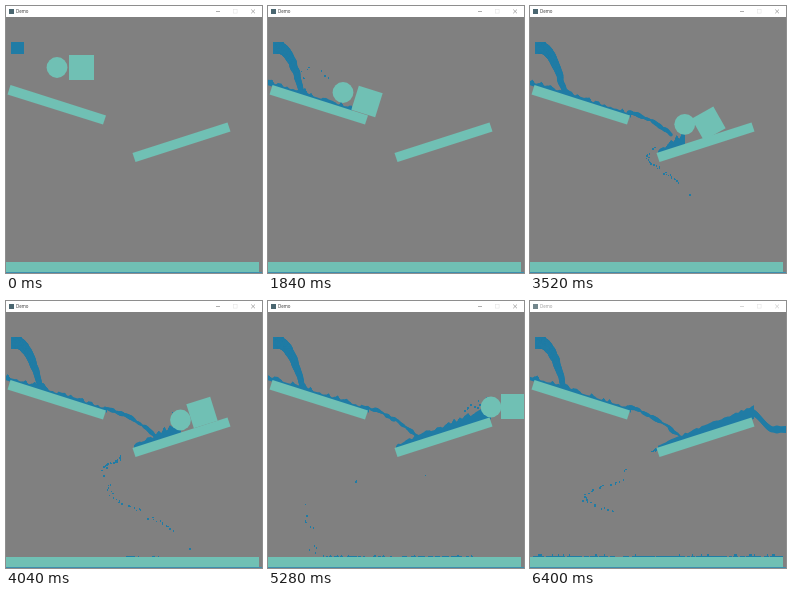
Animation, 256 px wide and 267 px high, one loop 6440 ms. Source, as an HTML page with a canvas:

```html
<!DOCTYPE html>
<html lang="en">
<head>
<meta charset="utf-8">
<title>Fluid demo</title>
<style>
html, body { margin: 0; width: 100%; height: 100%; overflow: hidden; background: #808080; }
canvas { display: block; width: 100vw; height: 100vh; }
#name { position: absolute; left: 10px; top: 2px; font: 4.4px/7px "Open Sans", Arial, sans-serif; }
</style>
</head>
<body>
<canvas id="stage" width="256" height="267"></canvas>
<div id="name">Demo</div>
<script>
const LOOP = 6440, STEP = 40, GRAVITY = 52;
const AIR = '#808080', WATER = '#207ca5', SOLID = '#70c0b4';
const g = document.getElementById('stage').getContext('2d');
const label = document.getElementById('name');

const clamp = (v, a, b) => Math.max(a, Math.min(b, v));
const mix = (a, b, k) => a + (b - a) * k;
const ramp = (v, a, b) => clamp((v - a) / (b - a), 0, 1);
const smooth = k => k * k * (3 - 2 * k);
const fall = t => GRAVITY / 2 * t * t;
const hash = n => { const s = Math.sin(n * 127.1 + 11.7) * 43758.5453; return s - Math.floor(s); };
const noise = v => { const i = Math.floor(v); return mix(hash(i), hash(i + 1), smooth(v - i)); };
const slope1 = x => 79 + 0.321 * (x - 5);
const slope2 = x => 147 - 0.321 * (x - 126.5);

// Landing point first, then a few points on the way out: [time, x, y, degrees]
const boxPath = [
  [0.94, 75.5, 84.5, 0], [1.84, 99, 95.5, 17.5], [2.96, 158, 119.5, 45], [4.04, 196, 111.5, 72.5],
  [4.76, 224.5, 102.5, 74], [5.28, 245.5, 105.5, 90], [5.8, 275, 121, 110]
];
const ballPath = [
  [0.88, 51, 81.6], [1.84, 75, 86.5], [2.96, 132, 113], [4.04, 174.5, 119],
  [4.76, 203.5, 110.5], [5.28, 223, 106], [6.1, 268, 128]
];

// Free fall until the first point, then a smooth curve through the rest
function follow(path, t) {
  if (t < path[0][0]) return [path[0][1], 61.5 + fall(t), 0];
  let i = 0;
  while (i < path.length - 2 && t > path[i + 1][0]) i++;
  const a = path[i], b = path[i + 1], p = path[i - 1] || a, n = path[i + 2] || b;
  const d = b[0] - a[0], k = ramp(t, a[0], b[0]), k2 = k * k, k3 = k2 * k;
  return a.slice(1).map((v, j) => {
    const w = b[j + 1];
    const va = (w - p[j + 1]) / (b[0] - p[0]) * d;
    const vb = (n[j + 1] - v) / (n[0] - a[0]) * d;
    return mix(v, w, smooth(k)) + (k3 - 2 * k2 + k) * va + (k3 - k2) * vb;
  });
}

// Drops spilling off the second ramp; the aim wanders, so neighbours form strings
const drops = [];
for (let born = 2.72; born < 6.4; born += 0.014) {
  const i = drops.length, late = ramp(born, 2.8, 3.8);
  if (noise(born * 9) + 0.3 * hash(born) < mix(0.6, 0.8, ramp(born, 4, 5))) continue;
  drops.push({
    born, life: 9, seed: i * 5,
    x: mix(122, 125, late) + 2 * hash(i), y: mix(125, 147, late),
    vx: mix(15, -60, late) + 60 * (noise(born * 4 + 3) - 0.5) + 8 * (hash(i + 0.5) - 0.5),
    vy: mix(60, 30, late) + 12 * (noise(born * 7) - 0.5)
  });
}

function splash(time, x, y, count, speed, lift, life) {
  for (let i = 0; i < count; i++) {
    const seed = time * 100 + i * 3;
    drops.push({
      born: time + 0.2 * hash(seed), life, seed, x, y,
      vx: speed * (hash(seed + 1) * 1.4 - 0.2), vy: -lift * (0.5 + 0.5 * hash(seed + 2))
    });
  }
}
splash(1.28, 34, 81, 9, 45, 60, 0.75);
splash(2.6, 118, 108, 9, 60, 60, 0.6);
splash(3.35, 170, 110, 1, 120, 25, 2);
splash(4.85, 188, 116, 9, 70, 60, 0.7);

function disc(x, y, r) {
  g.beginPath();
  g.arc(x, y, r, 0, 7);
  g.fill();
}
function poly(...p) {
  g.beginPath();
  for (let i = 0; i < p.length; i += 2) g.lineTo(p[i], p[i + 1]);
  g.fill();
}

function drawDrops(t) {
  for (const d of drops) {
    const a = t - d.born;
    if (a < 0 || a > d.life) continue;
    const y = d.y + d.vy * a + fall(a);
    if (y > 255) continue;
    g.fillRect(Math.round(d.x + d.vx * a), Math.round(y), hash(d.seed) > 0.5 ? 2 : 1, hash(d.seed + 1) > 0.4 ? 2 : 1);
  }
}

function drawInflow(t) {
  g.fillRect(5, 36, t < 0.3 ? 13 : 11, 12);
  for (let a = 0; a < Math.min(t, 1.27); a += 0.02) {
    const sway = a * (noise(a * 9 - t * 8) - 0.5) * 1.6;
    disc(11 + 17.8 * a + sway, 42 + fall(a), 6 - 2.6 * a);
  }
}

function drawFilm(t, boxX) {
  const run = t - 1.25;
  if (run < 0) return;
  const left = Math.max(0, 33 - 75 * run);
  const right = Math.min(33 + 85 * run, boxX - 14, 101);
  for (let x = Math.floor(left); x < right; x++) {
    const bump = noise(x / 3 - t * 11);
    const h = 1.4 + 3.6 * bump * bump + 3 * Math.exp(-(((x - 35) / 5) ** 2));
    g.fillRect(x, slope1(x) - h, 1, h + 2);
  }
}

function drawJet(t) {
  for (let u = 0; u < Math.min(35 * (t - 2.3), 52); u += 0.7) {
    const r = 0.9 + 1.5 * noise(u / 3 - t * 10);
    const sway = 2 * (noise(u / 5 - t * 7 + 40) - 0.5);
    disc(99 + u, 106.5 + 0.25 * u + 0.0063 * u * u + sway, r);
  }
}

// Water piling up behind the ball while it crosses the gap
function drawSplat(t, ballX) {
  const size = ramp(t, 2.4, 2.8) * (1 - ramp(t, 3.1, 3.5));
  for (let d = -15; d < 17; d++) {
    const w = size * (7 - Math.abs(d) * 0.35) * (0.5 + noise(d / 2.5 + t * 4));
    if (w > 0.6) g.fillRect(Math.round(ballX - 11 - w / 2), 116 + d, w, 1);
  }
}

// Wedge held back by the ball, calmer once the ball is gone
function drawPool(t, ballX) {
  if (t < 3.2) return;
  const end = Math.min(ballX, 224), chop = mix(6, 2, ramp(t, 4.8, 6));
  for (let x = 128; x < end; x++) {
    const k = (x - 128) / (end - 128);
    const deep = 2 + 9 * Math.pow(k, 0.8);
    const h = deep + chop * (noise(x / 2.8 - t * 8) - 0.5) * Math.min(1, deep / 6);
    g.fillRect(x, slope2(x) - h, 1, h + 2);
  }
}

function drawOverflow(t) {
  for (let x = 221; x < Math.min(222 + 55 * (t - 5.55), 258); x++) {
    const y = mix(111, 128.5, smooth(ramp(x, 220, 243)));
    const h = 6 + 2 * noise(x / 4 - t * 9);
    g.fillRect(x, y - h / 2, 1, h);
  }
}

function drawPuddle(t) {
  if (t < 3.95) return;
  const wet = Math.pow(ramp(t, 3.95, 6), 1.5);
  for (let x = Math.floor(mix(118, 0, wet)); x < mix(152, 253, wet); x++) {
    const v = noise(x / 2.2 + Math.floor(t * 5) * 3.1);
    if (v < 0.55 - 0.35 * wet) continue;
    const h = v > 0.82 ? 1 + 2 * wet : 1;
    g.fillRect(x, 256 - h, 1, h);
  }
}

function drawSolids([x, y, turn], [ballX, ballY]) {
  g.fillStyle = SOLID;
  poly(4.5, 79, 100, 109.5, 97, 118.5, 1.5, 88.5);
  poly(126.5, 147, 221.5, 116.5, 224.5, 125.5, 129.5, 156);
  g.fillRect(0, 256, 253, 10);
  disc(ballX, ballY, 10.4);
  g.save();
  g.translate(x, y);
  g.rotate(turn * Math.PI / 180);
  g.fillRect(-12.5, -12.5, 25, 25);
  g.restore();
  g.fillStyle = '#3d8fae';
  g.fillRect(0, 266, 256, 1);
}

function drawTitleBar(active) {
  g.fillStyle = '#fff';
  g.fillRect(0, 0, 256, 11);
  g.fillStyle = active ? '#4a6670' : '#72868c';
  g.fillRect(3, 3, 5, 5);
  g.lineWidth = 0.6;
  g.strokeStyle = active ? '#777' : '#bbb';
  g.beginPath();
  g.moveTo(210, 5.5); g.lineTo(214, 5.5);
  g.moveTo(245.2, 3.5); g.lineTo(249, 7.3);
  g.moveTo(249, 3.5); g.lineTo(245.2, 7.3);
  g.stroke();
  g.strokeStyle = '#e4e4e4';
  g.strokeRect(227.5, 3.5, 3.6, 3.6);
  label.style.color = active ? '#333' : '#999';
}

function draw(t) {
  const box = follow(boxPath, t), ball = follow(ballPath, t);
  g.fillStyle = AIR;
  g.fillRect(0, 0, 256, 267);
  g.fillStyle = WATER;
  drawInflow(t);
  drawFilm(t, box[0]);
  drawJet(t);
  drawSplat(t, ball[0]);
  drawPool(t, ball[0]);
  drawOverflow(t);
  drawPuddle(t);
  drawDrops(t);
  drawSolids(box, ball);
  drawTitleBar(t < 6.3);
}

const start = performance.now();
function tick() {
  const ms = (performance.now() - start) % LOOP;
  draw(Math.floor(ms / STEP) * STEP / 1000);
  requestAnimationFrame(tick);
}
tick();
</script>
</body>
</html>
```
